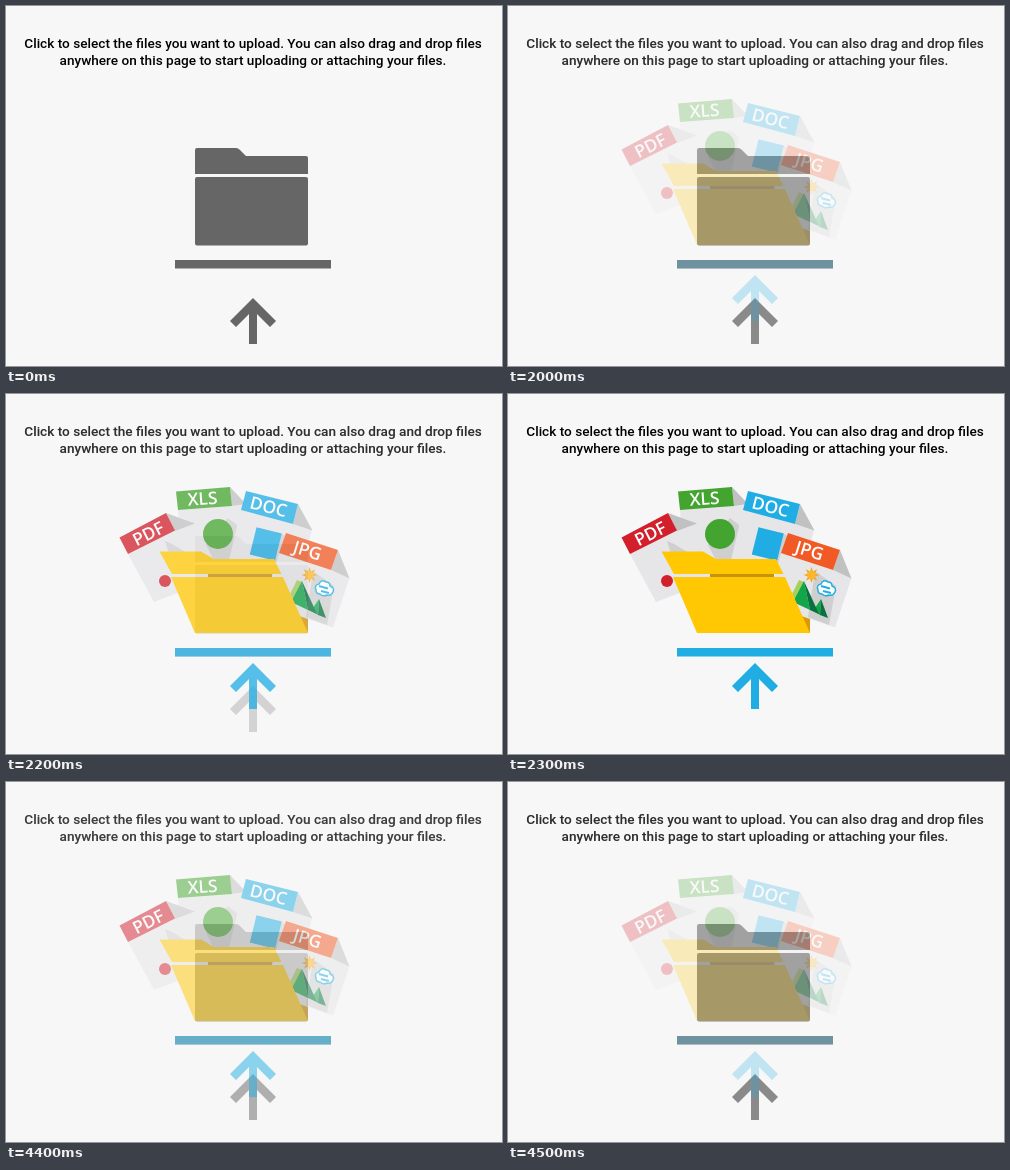
Write an HTML page that moves like this. It is 496x360 px and loops after 4600 ms.

```html
<!DOCTYPE html>
<html lang="en">
<head>
<meta charset="utf-8">
<title>File upload</title>
<style>
html, body { margin: 0; width: 100%; height: 100%; overflow: hidden; background: #f7f7f7; }
svg { display: block; }
text { text-anchor: middle; }
.hint { font: 500 13.6px Roboto, sans-serif; fill: #000; }
.label { font: 600 17.5px "Open Sans", sans-serif; fill: #fff; }
.page { fill: #e6e6e8; }
.fold { fill: #c1c1c2; }
.shade { fill: #cfcfd0; }
</style>
</head>
<body>
<svg width="496" height="360" viewBox="0 0 496 360">
  <defs>
    <g id="hint" class="hint">
      <text x="247" y="42">Click to select the files you want to upload. You can also drag and drop files</text>
      <text x="247" y="59">anywhere on this page to start uploading or attaching your files.</text>
    </g>
    <path id="bar" d="M169 254h156v8.500H169z"/>
    <path id="arrow" d="M247 269l23 23-6 6-13-13v30h-8v-30l-13 13-6-6z"/>
  </defs>

  <g id="closed" fill="#666">
    <use href="#hint"/>
    <path d="M191 142h39q2 0 4 2l6 6h60q2 0 2 2v16H189v-24q0-2 2-2z"/>
    <rect x="189" y="171" width="113" height="68.500" rx="2"/>
    <use href="#bar"/>
    <use href="#arrow" y="23"/>
  </g>

  <g id="open" fill="#20ade4">
    <use href="#hint"/>
    <path fill="#d99a0a" d="M280 190h22v49h-22z"/>

    <!-- XLS -->
    <path class="page" d="M172 116l54-4 14-2 5 65-68 4z"/>
    <path class="shade" d="M222 124l9 7v34h-31l-2-12z"/>
    <path class="fold" d="M224 93l16 17-14 2z"/>
    <path fill="#43a52f" d="M170 97.500l54-4.500 2 19-54 4z"/>
    <circle cx="212" cy="140" r="15" fill="#43a52f"/>
    <text class="label" transform="translate(196.500 104.500) rotate(-4)" y="6.300">XLS</text>

    <!-- PDF -->
    <path class="page" d="M122 160l46-23 21-7.500 27 52.500-68 26z"/>
    <path class="shade" d="M159 147l7 3 22 13h-24z"/>
    <path class="fold" d="M160 119l29 10.500-20 7.500z"/>
    <path fill="#d21f2b" d="M113.500 143.500L160 119l9 17.500-47 23.500z"/>
    <circle cx="159" cy="187" r="6" fill="#d21f2b"/>
    <text class="label" transform="translate(142.300 139.500) rotate(-27)" y="6.300">PDF</text>

    <!-- DOC -->
    <path class="page" d="M235 116l52 14 19 6-11 40-72-10z"/>
    <path class="shade" d="M272 138l12 6-5 28h-18z"/>
    <path class="fold" d="M292 110l14.500 26.500L287 130z"/>
    <path d="M240 97l52 13-5 20-52-14z"/>
    <rect x="-13" y="-13" width="26" height="28" transform="translate(260 149) rotate(14)"/>
    <text class="label" transform="translate(262.500 112.500) rotate(14)" y="6.300">DOC</text>

    <!-- JPG -->
    <path class="page" d="M273 159l52 17 18.500 8L327 233.500 258 210z"/>
    <path class="shade" d="M307 177l21 15-7 39-21-8z"/>
    <path class="fold" d="M332 156l11.500 28.500L325 176z"/>
    <path fill="#f15a24" d="M280 139l52 17-7 20-52-17z"/>
    <text class="label" transform="translate(301.500 156.500) rotate(17)" y="6.300">JPG</text>
    <g fill="#f5a623" transform="translate(303.500 181)">
      <path id="rays" d="M0-8l2 6 6 2-6 2-2 6-2-6-6-2 6-2z"/>
      <use href="#rays" transform="rotate(45)"/>
      <circle r="4" fill="#fbb829"/>
    </g>
    <path fill="#fff" stroke="#20ade4" stroke-width="1.500" d="M310 196q-2-5 3-6 2-5 7-2 4 0 4 4 5 2 3 6-2 4-6 3-4 2-7-1-4 0-4-4z"/>
    <path fill="none" stroke="#20ade4" stroke-width="2" d="M313 192l9 2.500M315 197l8 2"/>
    <path fill="#a5d15a" d="M291 186l-7 14 5 9 7-21z"/>
    <path fill="#12a64a" d="M296 187l-11 21 17 8zM313 205l-8 12 7 4z"/>
    <path fill="#08713d" d="M296 187l15 33-9-4zM313 205l7 19-8-3z"/>

    <!-- Folder -->
    <path fill="#c9920c" d="M202 179h64v5h-64z"/>
    <path fill="#ffc802" d="M153.500 157.500H195l13 7.500h60l7.500 15H166zM165 183h112l25 56H189z"/>

    <use href="#bar"/>
    <use href="#arrow"/>
  </g>
</svg>
<script>
const closed = document.getElementById("closed");
const open = document.getElementById("open");

// Stepped crossfade: quarters of opacity, 100 ms each.
function openness(t) {
  if (t < 2000) return 0;
  if (t < 4300) return Math.min(4, Math.floor((t - 1900) / 100)) / 4;
  return (3 - Math.floor((t - 4300) / 100)) / 4;
}

function draw() {
  const amount = openness(performance.now() % 4600);
  open.setAttribute("opacity", amount);
  closed.setAttribute("opacity", 1 - amount);
  requestAnimationFrame(draw);
}
draw();
</script>
</body>
</html>
```
